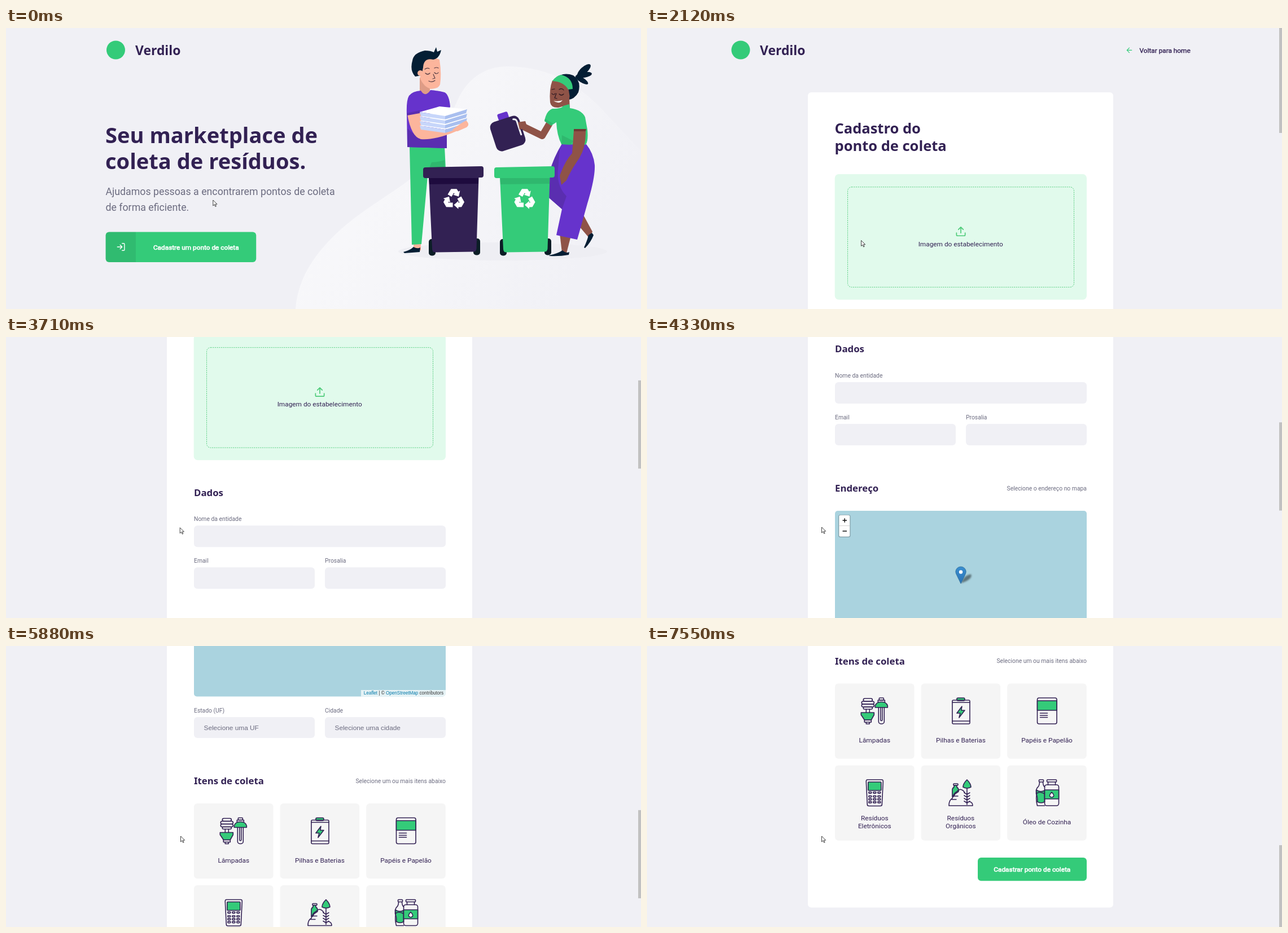
An HTML page that plays this animation: 1125x498 px, repeating every 7.78 s.

```html
<!DOCTYPE html>
<html lang="pt-BR">
<head>
<meta charset="utf-8">
<title>Verdilo</title>
<style>
html, body { margin: 0; width: 100%; height: 100%; overflow: hidden; background: #f0f0f5; }
svg { display: block; width: 1125px; height: 498px; }
text { font: 11.84px Roboto, sans-serif; fill: #322153; }
.title { font: bold 25.5px "Noto Sans", sans-serif; }
.hero { font-size: 38.1px; }
.brand { font-size: 22.9px; }
.section { font-size: 16.8px; }
.lead { font-size: 17.76px; fill: #6c6c80; }
.label { font-size: 10.36px; fill: #6c6c80; }
.select { font-family: "Liberation Sans", Arial, sans-serif; fill: #6c6c80; }
.credit { font: 8.14px "Liberation Sans", Arial, sans-serif; fill: #333; }
.credit tspan { fill: #0078a8; }
.strong { stroke: #322153; stroke-width: .4px; }
.cta { fill: #fff; stroke: #fff; stroke-width: .65px; }
.mid { text-anchor: middle; }
.end { text-anchor: end; }
.line { fill: none; stroke-width: 2; stroke-linecap: round; stroke-linejoin: round; }
.fine { stroke-width: 1.2; }
.field { fill: #f0f0f5; }
.green { fill: #34cb79; }
.leaf { fill: #2fb86e; }
.ink { fill: #322153; }
.navy { fill: #041e34; }
.violet { fill: #6633cc; }
.dusk { fill: #5a2eb0; }
.peach { fill: #fcb59c; }
.brown { fill: #8f5347; }
.icon { fill: none; stroke: #322153; stroke-width: 1.6; stroke-linejoin: round; stroke-linecap: round; }
</style>
</head>
<body>
<svg viewBox="0 0 1125 498">
<defs>
  <linearGradient id="mist" x1="0" y1="0" x2="1" y2=".4">
    <stop offset="0" stop-color="#fafafc"/><stop offset=".5" stop-color="#f6f6f9"/><stop offset="1" stop-color="#f1f1f6"/>
  </linearGradient>
  <linearGradient id="pinBlue" x2="0" y2="1"><stop stop-color="#3a8fd0"/><stop offset="1" stop-color="#2a72b5"/></linearGradient>
  <filter id="blur"><feGaussianBlur stdDeviation="1.5"/></filter>
  <path id="arrow" d="M-11-8.6-5-18.5H5L8-13.8 10.8-15.4 8.5-4.9-1.5-8.3 1.1-9.8 0-11.7-4.1-4.6z"/>
  <g id="recycle" fill="#fff">
    <use href="#arrow"/><use href="#arrow" transform="rotate(120)"/><use href="#arrow" transform="rotate(240)"/>
  </g>
  <g id="bin">
    <path d="M749 264H837.5L833.5 391Q833 396.5 828 396.5L760 397.5Q755.5 397.5 755 392z"/>
    <path d="M743 247 842 245Q846 245 846 249V261Q846 265 842 265L743 266Q739 266 739 262V251Q739 247 743 247z"/>
  </g>
  <g id="wheels" fill="#0b1d26"><rect x="749" y="374" width="12" height="29.5" rx="5"/><rect x="828" y="373" width="12" height="29.5" rx="5"/></g>
</defs>

<g id="home">
  <path fill="url(#mist)" d="M513 498C517 440 551 395 594 356C640 316 690 290 723 262C768 222 780 170 800 128C818 88 850 68 889 68C950 68 1005 92 1052 140L1125 218V498z"/>
  <ellipse cx="880" cy="396" rx="185" ry="16" fill="#eeeef3"/>
  <circle class="green" cx="194.5" cy="39" r="16.5"/>
  <text class="title brand" x="229" y="47.5">Verdilo</text>
  <text class="title hero" x="176" y="204">Seu marketplace de</text>
  <text class="title hero" x="176" y="250">coleta de resíduos.</text>
  <text class="lead" x="176.5" y="296.3">Ajudamos pessoas a encontrarem pontos de coleta</text>
  <text class="lead" x="176.5" y="324.1">de forma eficiente.</text>
  <rect class="green" x="176.6" y="361.6" width="266.6" height="53.4" rx="6"/>
  <rect class="leaf" id="hover" x="176.6" y="361.6" width="266.6" height="53.4" rx="6"/>
  <path fill-opacity=".08" d="M182.6 361.6H230V415H182.6Q176.6 415 176.6 409V367.6Q176.6 361.6 182.6 361.6z"/>
  <path class="line" stroke="#fff" transform="translate(195.2 379.6) scale(.7)" d="M15 3h4a2 2 0 0 1 2 2v14a2 2 0 0 1-2 2h-4M10 17l5-5-5-5M15 12H3"/>
  <text class="cta mid" x="336.8" y="392.5">Cadastre um ponto de coleta</text>

  <!-- man -->
  <path class="peach" d="M722 380h13v14h-13z"/>
  <path class="navy" d="M704 397Q716 394 722 388 729 392 734 389L733 397Q720 398 706 399z"/>
  <path class="green" d="M715 210H777L779 250 747 262 736 383 719 384z"/>
  <path class="leaf" d="M754 238Q766 238 777 234V248H750z"/>
  <path fill="#de9c86" d="M733 88h18v24q-8 12-18 0z"/>
  <path class="violet" d="M735 111Q720 112 714 120 709 128 710 153L711 211 781 213V160L787 139Q785 118 777 114 765 111 752 110 743 124 735 111z"/>
  <path class="dusk" d="M711 178 732 196 781 187V213L711 211z"/>
  <path class="peach" d="M733 62Q750 47 768 56 772 80 769 100 766 108 752 108 740 104 734 90z"/>
  <path class="navy" d="M725 86Q715 75 720 58 722 44 742 40 752 40 758 43L762 34 764 42 771 39Q768 54 757 56 740 52 739 70L736 84z"/>
  <circle class="peach" cx="734" cy="80" r="5"/>
  <path class="line fine" stroke="#553c44" d="M743 80q4 4 8 0M759 79q4 4 7 0M742 73q4-3 8-1M759 71q4-2 7 0M749 94q6 3 11-1M757 82l3 7-4 1"/>
  <path class="peach" d="M711 153 733 148Q738 166 741 179L790 180 815 164Q822 170 817 175L788 187Q755 199 735 197 718 193 711 153z"/>
  <path class="dusk" d="M710 151 733 146V151L711 155z"/>
  <g id="papers"></g>
  <path class="peach" d="M790 181Q805 169 815 164 822 171 816 176L800 183z"/>

  <!-- woman, behind the bin -->
  <path class="brown" d="M1010 345 1020 326 1039 361 1033 372z"/>
  <path class="navy" d="M1024 389Q1030 376 1032 367L1038 363 1041 367Q1036 380 1026 390z"/>
  <path class="brown" d="M981 364 1001 368 993 399 985 398z"/>
  <path class="violet" d="M985 205Q970 230 963 255L961 300 985 321 975 367 1012 375Q1022 340 1030 311 1044 265 1043 243 1041 222 1028 206z"/>
  <path class="dusk" d="M981 213Q966 240 963 260L961 300 985 321 993 298Q975 280 978 250z"/>

  <use href="#wheels"/>
  <use href="#bin" class="ink"/>
  <path fill="#1e0b3e" d="M749.5 266H837V276L750 277z"/>
  <use href="#recycle" x="793.5" y="303.7"/>
  <use href="#wheels" x="126"/>
  <use href="#bin" class="green" x="126"/>
  <path class="leaf" d="M875.5 266H963V276L876 277z"/>
  <use href="#recycle" x="919" y="303.7"/>
  <path class="navy" d="M962 403Q977 400 986 394 992 400 998 397L997 402Q980 405 963 404z"/>

  <!-- woman -->
  <path fill="none" stroke="#8f5347" stroke-width="12" stroke-linejoin="round" d="M963 169 950 191 913 173"/>
  <g transform="rotate(-18 889 187)">
    <rect class="violet" x="881" y="149" width="19" height="13" rx="3"/>
    <rect class="ink" x="862" y="160" width="54" height="54" rx="10"/>
    <path class="line" stroke="#f0f0f5" style="stroke-width:3" d="M906 166Q911 167 911 172V196"/>
  </g>
  <path class="brown" d="M907 167 920 165 924 177 910 180z"/>
  <g class="navy">
    <ellipse cx="1024" cy="75" rx="15" ry="6" transform="rotate(-42 1024 75)"/>
    <ellipse cx="1024" cy="83" rx="14" ry="5" transform="rotate(-8 1024 83)"/>
    <ellipse cx="1020" cy="92" rx="13" ry="4.5" transform="rotate(32 1020 92)"/>
    <path d="M973 90Q986 77 1005 84 1020 94 1014 114 1008 126 994 128L980 95z"/>
  </g>
  <path class="brown" d="M968 93Q962 108 964 132 966 142 979 141L986 139V145H999L998 124 1002 109Q987 90 968 93z"/>
  <path class="navy" d="M996 105 1007 104Q1008 118 999 123z"/>
  <path class="green" d="M968 94Q975 84 984 83 1004 88 1004 108L996 109Q988 95 968 94z"/>
  <path class="line fine" stroke="#2b1720" d="M967 116q3 4 6 0M980 117q4 4 8 0M967 109l5-1M980 109q5-3 8 1M975 116l-3 8 4 1"/>
  <path fill="#fff" d="M970 129Q978 131 986 128 980 136 970 129z"/>
  <path class="green" d="M968 143Q985 143 987 138L998 135 999 142Q1020 145 1026 158L1030 180Q1032 200 1027 207L984 206Q976 190 975 167L966 173 954 165Q957 147 968 143z"/>
  <path class="leaf" d="M955 161 969 169 966 173 954 165zM985 190 1005 200 1000 207 984 206z"/>
  <path class="brown" d="M1006 181H1027Q1028 215 1012 236 1001 252 993 270L984 278 981 262Q990 236 1003 222z"/>
  <path fill="#6f3a34" d="M1006 179H1028L1027 183H1006z"/>
</g>

<g id="page">
  <circle class="green" cx="166" cy="39" r="16.5"/>
  <text class="title brand" x="200" y="47.5">Verdilo</text>
  <path class="line" stroke="#34cb79" transform="translate(847.3 32.2) scale(.6)" d="M19 12H5M12 19l-7-7 7-7"/>
  <text class="strong" x="872.5" y="43.5">Voltar para home</text>
  <rect x="285" y="114" width="541" height="1557" rx="6" fill="#fff"/>
  <text class="title" x="332.5" y="187">Cadastro do</text>
  <text class="title" x="332.5" y="218">ponto de coleta</text>
  <rect x="332.7" y="259" width="446.3" height="222.5" rx="7" fill="#e1faec"/>
  <rect x="355.5" y="281.8" width="401" height="177.5" rx="7" fill="none" stroke="#4ecb79" stroke-width=".9" stroke-dasharray="2.2 1.5"/>
  <path class="line" stroke="#4ecb79" transform="translate(545.8 350.4) scale(.85)" d="M21 15v4a2 2 0 0 1-2 2H5a2 2 0 0 1-2-2v-4M17 8l-5-5-5 5M12 3v12"/>
  <text class="mid" x="555.7" y="386.5">Imagem do estabelecimento</text>

  <text class="title section" x="333" y="544.7">Dados</text>
  <text class="label" x="333" y="589.3">Nome da entidade</text>
  <rect class="field" x="333" y="597.5" width="446" height="38" rx="6"/>
  <text class="label" x="333" y="663.3">Email</text>
  <text class="label" x="565" y="663.3">Prosalia</text>
  <rect class="field" x="333" y="671.5" width="214" height="38" rx="6"/>
  <rect class="field" x="565" y="671.5" width="214" height="38" rx="6"/>

  <text class="title section" x="333" y="791.5">Endereço</text>
  <text class="label end" x="779" y="789">Selecione o endereço no mapa</text>
  <rect x="333" y="825.5" width="446" height="259" rx="5" fill="#aad3df"/>
  <rect x="339" y="832.5" width="21.5" height="40" rx="3.5" fill-opacity=".25"/>
  <rect x="340.3" y="833.3" width="19" height="38" rx="2.5" fill="#fff"/>
  <path d="M340.3 852H359.3" stroke="#ccc" stroke-width=".8"/>
  <path d="M346.5 842.5H354M350.2 838.8V846.2M346.5 861.5H354" stroke="#111" stroke-width="1.4"/>
  <path d="M556 954Q562 939 574 938 577 944 566 950z" fill-opacity=".45" filter="url(#blur)"/>
  <path fill="url(#pinBlue)" stroke="#2e6c97" stroke-width=".8" d="M556 954.5 549 940Q546.8 936 546.8 933.5A9.2 9 0 0 1 565.2 933.5Q565.2 936 563 940z"/>
  <circle cx="556" cy="934" r="3.2" fill="#fff"/>
  <path fill="#fff" fill-opacity=".7" d="M629 1073H779V1084.5H629z"/>
  <text class="credit end" x="775" y="1081.3"><tspan>Leaflet</tspan> | © <tspan>OpenStreetMap</tspan> contributors</text>

  <text class="label" x="333" y="1112.5">Estado (UF)</text>
  <text class="label" x="565" y="1112.5">Cidade</text>
  <rect class="field" x="333" y="1121" width="214" height="37" rx="6"/>
  <rect class="field" x="565" y="1121" width="214" height="37" rx="6"/>
  <text class="select" x="350.5" y="1143.7">Selecione uma UF</text>
  <text class="select" x="582.5" y="1143.7">Selecione uma cidade</text>

  <text class="title section" x="333" y="1240">Itens de coleta</text>
  <text class="label end" x="779" y="1237.5">Selecione um ou mais itens abaixo</text>
  <g id="items"></g>
  <rect class="green" x="586" y="1582.5" width="193" height="41.3" rx="6"/>
  <text class="cta mid" x="682.3" y="1607.4">Cadastrar ponto de coleta</text>
</g>

<rect id="thumb" x="1120" width="5" fill="#c1c1c1"/>
<g id="cursor" fill="#fff" stroke="#222" stroke-width=".85" stroke-linejoin="round">
  <path id="pointer" d="M0 0V10L2.4 7.8 4.1 11.5 5.6 10.8 4 7.2H7.2z"/>
  <path id="hand" d="M-1.2 1Q0-.8 1.2 1V5L6 6Q7.4 6.5 7.2 8L6 13H0L-3.8 8.5Q-4 7-2.6 7.2L-1.2 8.2z"/>
</g>
</svg>

<script>
const $ = id => document.getElementById(id);

$("papers").innerHTML = [24, 16, 8, 0].map(y => `<g transform="translate(0 ${y})">
  <path fill="#fff" d="M733 149 768 139 817 144 778 156z"/>
  <path fill="#c7d6fa" d="M733 149 778 156V162L735 156z"/>
  <path fill="#a9bfef" d="M778 156 817 144 815 151 778 162z"/></g>`).join("");

const box = (x, y, w, h, r = 1, cls = "") =>
  `<rect x="${x}" y="${y}" width="${w}" height="${h}" rx="${r}" class="${cls}"/>`;
const path = (d, cls = "") => `<path d="${d}" class="${cls}"/>`;
const keys = Array.from({ length: 12 }, (_, i) =>
  box(-10.5 + i % 3 * 8, (i < 3 ? -1.5 : 0) + Math.floor(i / 3) * 5.2, 5, 2.6)).join("");

const items = [
  [["Lâmpadas"],
    box(-20, -22, 16, 5, 2.5) + box(-23, -17, 22, 5, 2.5) + box(-23, -12, 22, 5, 2.5) + box(-20, -7, 16, 4, 2) +
    path("M-15-3V3M-9-3V3M-18 16H-6V20H-18zM-15 20H-9V23H-15z") +
    path("M-24 3H-1V7L-6 16H-18L-24 7z", "green") +
    box(8, -23, 8, 4) + path("M6-15V-19H18V-15") +
    path("M1-6V-9Q3-16 12-16T23-9V-6z", "green") +
    path("M7-6V19A5 4 0 0 0 17 19V-6M10.5-6V16A1.5 1.5 0 0 0 13.5 16V-6")],
  [["Pilhas e Baterias"],
    box(-7, -23, 14, 5, 2, "green") + box(-15, -19, 31, 42, 2) + path("M-15-15H16M-15 18H16") +
    path("M2-8-7 4H-1L-3 12 7-1H1z", "green")],
  [["Papéis e Papelão"],
    box(-17, -23, 34.5, 46, 3) + box(-17, -18, 34.5, 17, 0, "green") + path("M-12 4H1M-12 8H1M-12 11.5H1")],
  [["Resíduos", "Eletrônicos"],
    path("M-13-23H13Q15-23 15-20L13 21Q13 23.5 10 23.5H-10Q-13 23.5-13 21L-15-20Q-15-23-13-23z") +
    box(-11.5, -19, 23, 15, 1, "green") + keys],
  [["Resíduos", "Orgânicos"],
    path("M-15 7V-5Q-15-8-12-10V-13H-7V-10Q-4-8-4-5V-2L-10 2-13 7z", "green") + box(-13, -16, 8, 3) +
    path("M-21 23Q-21 13-15 10-13 1-7-2-1-9 5-3L7 0M-21 23H21Q21 17 16 16M-16 12H-8M-13 6H-5") +
    path("M11-23Q18-16 18-10 11-6 4-10 4-16 11-23z", "green") +
    path("M11-8V21M6 0 11 3 16 0M6 5 11 8 16 5M6 10 11 13 16 10M6 15 11 18 16 15")],
  [["Óleo de Cozinha"],
    path("M-19-5Q-12 0-4-4V16Q-10 20-17 16 -16 8-19 2z", "green") + box(-14, -23, 8, 4) +
    path("M-13-19Q-13-12-17-9-20-5-18 2-20 12-17 23H-4M-7-19Q-7-13-4-10M-18 1Q-12-3-4 2") +
    box(0, -23, 17, 4) + path("M2-19V-14M15-19V-14") + box(-4, -14, 25, 37, 4) +
    box(-4, -5, 25, 16, 0, "green") +
    `<path fill="#fff" d="M8.5-1Q13 4 12 6 8.5 10.5 5 6 4 4 8.5-1z"/>`]
];

$("items").innerHTML = items.map(([lines, icon], i) => {
  const x = 333 + i % 3 * 152.6, y = 1274 + Math.floor(i / 3) * 145;
  const label = lines.map((line, n) =>
    `<text class="mid" x="70.3" y="${104.7 - 7 * (lines.length - 1) + 14.2 * n}">${line}</text>`).join("");
  return `<g transform="translate(${x} ${y})"><rect width="140.6" height="133.3" rx="6" fill="#f5f5f5"/>
    <g class="icon" transform="translate(70.3 48.5)">${icon}</g>${label}</g>`;
}).join("");

// Each move: first step time, last step time, number of steps, value reached.
const scrollMoves = [
  [2910, 3230, 5, 124.5], [3310, 3480, 3, 221], [3710, 4180, 7, 516],
  [4330, 4330, 1, 517.5], [4410, 4640, 4, 812], [5110, 5110, 1, 830.5], [5190, 5190, 1, 886],
  [5340, 5420, 2, 960], [5880, 5880, 1, 995], [5960, 6110, 3, 1107],
  [6660, 6810, 3, 1181], [7380, 7550, 3, 1207.5]
];
const cursorX = [[70, 70, 1, 364], [380, 1100, 10, 374], [1170, 1660, 7, 377], [1890, 1890, 1, 379.5],
  [2590, 2740, 3, 309], [2910, 3230, 5, 308], [3710, 4180, 7, 309.5]];
const cursorY = [[70, 70, 1, 307.5], [380, 1100, 10, 335], [1170, 1660, 7, 370], [1890, 1890, 1, 374],
  [2120, 2120, 1, 376.5], [2590, 2740, 3, 354], [2910, 3230, 5, 338], [3710, 4180, 7, 337]];
const hoverMoves = [[1490, 1660, 3, 1]];

function follow(moves, value, t) {
  for (const [start, end, steps, target] of moves) {
    if (t < start) break;
    const gap = (end - start) / (steps - 1) || 1;
    const step = Math.min(steps, 1 + Math.floor((t - start) / gap + .01));
    value += (target - value) * step / steps;
  }
  return value;
}

const show = (id, visible) => $(id).setAttribute("display", visible ? "inline" : "none");

function draw(t) {
  const onPage = t >= 2120, overButton = t >= 1490 && !onPage;
  const scroll = follow(scrollMoves, 0, t);
  show("home", !onPage);
  show("page", onPage);
  show("thumb", onPage);
  show("pointer", !overButton);
  show("hand", overButton);
  $("hover").setAttribute("opacity", follow(hoverMoves, 0, t));
  $("page").setAttribute("transform", `translate(0 ${-scroll})`);
  $("thumb").setAttribute("y", scroll * .2923);
  $("thumb").setAttribute("height", t < 2210 ? 186 : 156.3);
  $("cursor").setAttribute("transform", `translate(${follow(cursorX, 366.8, t)} ${follow(cursorY, 305, t)})`);
}

const startTime = performance.now();
function tick() {
  draw((performance.now() - startTime) % 7780);
  requestAnimationFrame(tick);
}
tick();
</script>
</body>
</html>
```
